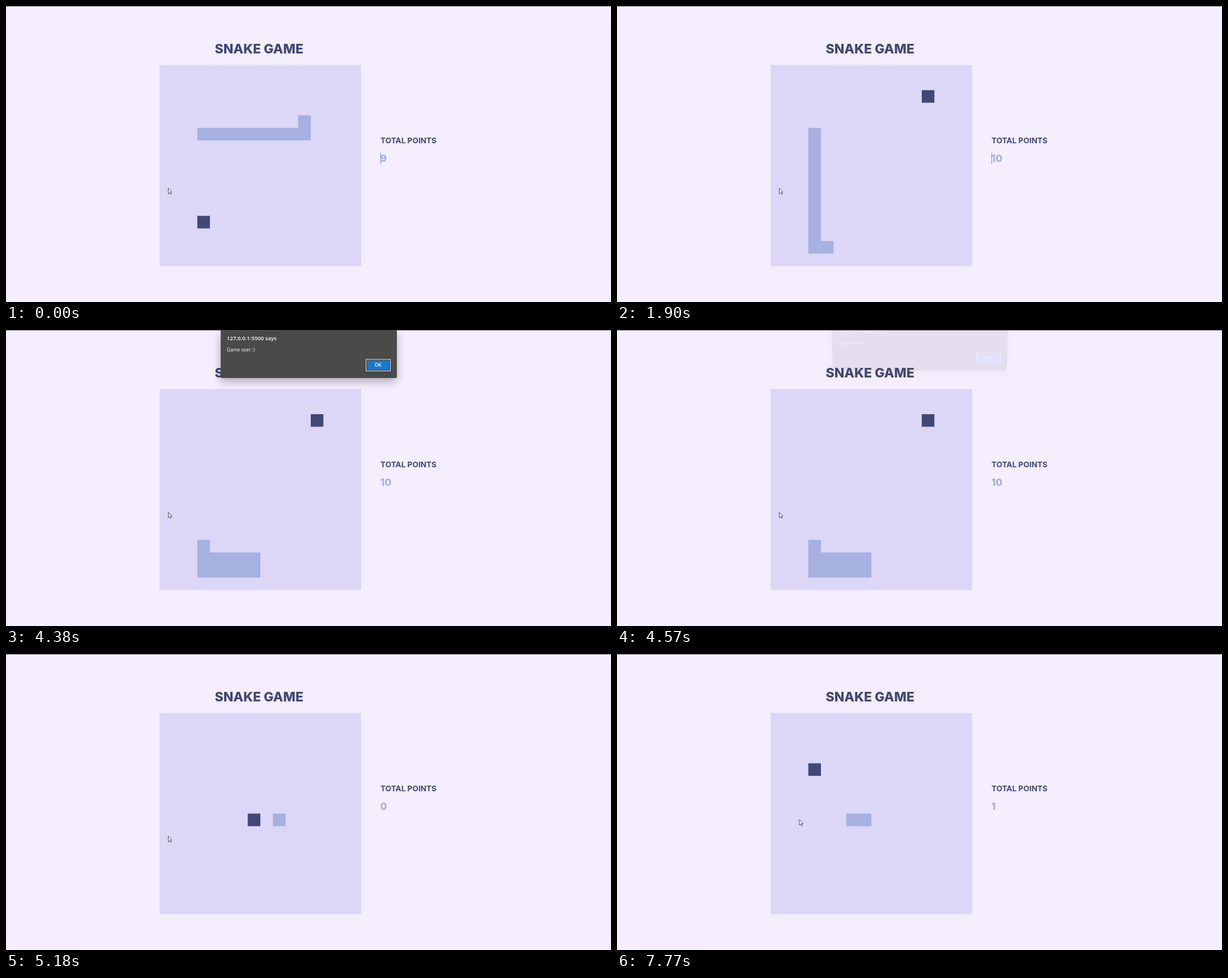
These frames come from a looping animation (1068x524 px, 7.99 s). An HTML page:

```html
<!DOCTYPE html>
<html lang="en">
<head>
<meta charset="utf-8">
<title>Snake game</title>
<style>
html, body { margin: 0; width: 100%; height: 100%; overflow: hidden; background: #f4eeff; }
svg { display: block; position: absolute; }
#stage { left: 0; top: 0; width: 1068px; height: 524px; font-family: Inter, Roboto, sans-serif; }
#alert {
  left: 379px; top: 0; width: 311px; height: 84.5px;
  background: #4a4a4a; border-radius: 0 0 2px 2px;
  box-shadow: 0 6px 16px rgba(0, 0, 0, .3);
  transform-origin: 50% 0;
  font-family: "Open Sans", "Noto Sans", sans-serif; fill: #fff;
}
</style>
</head>
<body>
<svg id="stage" viewBox="0 0 1068 524">
  <rect width="1068" height="1" fill="#77727f"/>
  <text x="368.5" y="84.3" font-size="23" font-weight="800" fill="#424874">SNAKE GAME</text>
  <g id="board">
    <rect x="271" y="104.5" width="356" height="356" fill="#dcd6f7"/>
    <path id="snake" fill="#a6b1e1"/>
    <path id="food" fill="#424874"/>
    <text id="score" x="660.8" y="276" font-size="17.2" font-weight="800" fill="#a6b1e1"></text>
  </g>
  <text id="label" x="661" y="242.8" font-size="13.6" font-weight="700" fill="#424874">TOTAL POINTS</text>
  <rect id="caret" x="661" y="260" width="1" height="20" fill="#7f88b5"/>
  <rect id="titleCaret" x="528" y="62" width="1" height="29" fill="#424874"/>
  <path id="cursor" d="M.5 .7v9.6l2.2-2 1.6 3.3 1.5-.7-1.5-3.2h2.7z" fill="#fff" stroke="#3b3944" stroke-width=".9"/>
</svg>
<svg id="alert" viewBox="0 0 311 84.5">
  <text x="10.8" y="18.2" font-size="9.6" font-weight="600">127.0.0.1:5500 says</text>
  <text x="10.8" y="38" font-size="8.4">Game over :)</text>
  <rect x="256.5" y="52" width="43" height="20.5" fill="none" stroke="#e4e4e4"/>
  <rect x="258.5" y="54" width="39" height="16.8" fill="#1a78c9"/>
  <text x="277.7" y="65.2" font-size="8.5" font-weight="600" text-anchor="middle">OK</text>
</svg>
<script>
const LOOP = 7990, CELL = 22.25, LEFT = 271, TOP = 104.5;
const el = Object.fromEntries([...document.querySelectorAll('[id]')].map(e => [e.id, e]));

// Moments at which the snake advances one cell, in each of the two rounds.
const firstMoves = [70, 270, 470, 670, 870, 1070, 1270, 1460, 1650, 1840, 2100, 2290, 2480, 2670, 2860, 3050, 3230];
const secondMoves = [5030, 5220, 5450, 5590, 5790, 5980, 6180, 6380, 6580, 6780, 6980, 7180, 7370, 7640, 7770];
const RELOAD = 4640, START = 4830, EATEN_FIRST = 1270, EATEN_SECOND = 7770;

const between = (t, a, b) => t >= a && t < b;
const passed = (times, t) => times.filter(x => x <= t).length;
const show = (node, on) => node.setAttribute('visibility', on ? 'visible' : 'hidden');
const cellPath = ([c, r]) => `M${LEFT + c * CELL} ${TOP + r * CELL}h${CELL}v${CELL}h${-CELL}z`;

function walk(corners) {
  const cells = [corners[0]];
  for (const [cx, cy] of corners.slice(1)) {
    let [x, y] = cells[cells.length - 1];
    while (x !== cx || y !== cy) {
      x += Math.sign(cx - x);
      y += Math.sign(cy - y);
      cells.push([x, y]);
    }
  }
  return cells;
}
const route = walk([[11, 4], [11, 5], [3, 5], [3, 14], [7, 14], [7, 13], [4, 13]]);

function gameState(t) {
  if (t < RELOAD) {
    const ate = t >= EATEN_FIRST, head = 9 + passed(firstMoves, t);
    return {
      cells: route.slice(head + 1 - (ate ? 11 : 10), head + 1),
      food: ate ? [12, 2] : [3, 12],
      score: ate ? 10 : 9
    };
  }
  const ate = t >= EATEN_SECOND, head = 8 + passed(secondMoves, t);
  const cells = [[head % 16, 8]];
  if (ate) cells.push([(head - 1) % 16, 8]);
  return { cells, food: ate ? [3, 4] : [7, 8], score: ate ? 1 : 0 };
}

// Opacity of the dialog, changing in steps of one screen refresh.
function dialogLevel(t) {
  const step = from => Math.floor((t - from) / 63.4);
  if (t < 3530 || t >= RELOAD) return 0;
  if (t < 4440) return [.1, .5, .85][step(3530)] ?? 1;
  return [.75, .35, .1][step(4440)] ?? 0;
}

function draw(t) {
  const { cells, food, score } = gameState(t);
  const loading = between(t, RELOAD, START);
  el.snake.setAttribute('d', cells.map(cellPath).join(''));
  el.food.setAttribute('d', cellPath(food));
  el.score.textContent = score;
  show(el.board, !loading);
  el.label.setAttribute('y', loading ? 259.8 : 242.8);

  show(el.caret, t < 370 || between(t, 880, 1390) || between(t, 1900, 2420));
  show(el.titleCaret, between(t, 2610, 3170));

  const slide = Math.min(3, Math.max(0, Math.floor((t - 5190) / 63) + 1)) / 3;
  el.cursor.setAttribute('transform', `translate(${286 + 35.5 * slide} ${322 - 29.5 * slide})`);

  const level = dialogLevel(t), away = (1 - level) / .9;
  el.alert.style.opacity = level;
  el.alert.style.transform = level === 1 ? 'none'
    : `translateY(${-11 * away}px) perspective(1000px) rotateX(${-9 * away}deg)`;
}

const begin = performance.now();
function frame() {
  draw((performance.now() - begin) % LOOP);
  requestAnimationFrame(frame);
}
frame();
</script>
</body>
</html>
```
